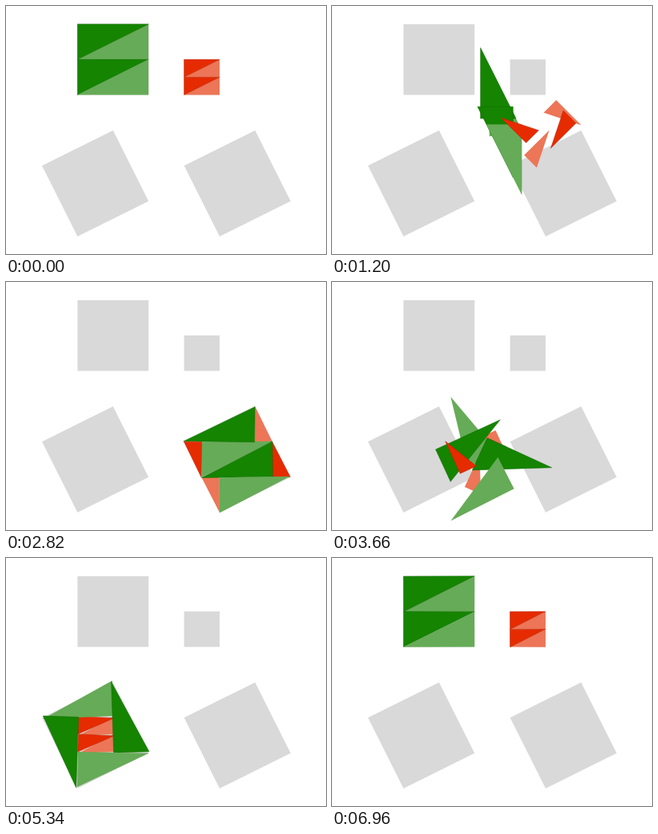
These frames come from a looping animation (400x311 px, 7.2 s). An HTML page:

```html
<!DOCTYPE html>
<html lang="en">
<head>
<meta charset="utf-8">
<title>Two squares into one</title>
<style>
  html, body { margin: 0; width: 100%; height: 100%; overflow: hidden; background: #fff; }
  svg { display: block; width: 400px; height: 311px; }
</style>
</head>
<body>
<svg id="stage" viewBox="0 0 400 311"></svg>
<script>
const UNIT = 44.4, LEFT = 45, TOP = 22.7;
const FRAME = 60, PHASE_FRAMES = 40, PHASES = 3;

const GREEN = { fill: '#158400', stroke: '#106a00', size: 1 };
const PALE_GREEN = { fill: '#66ab57', size: 1 };
const RED = { fill: '#e62b00', stroke: '#b82200', size: 0.5 };
const PALE_RED = { fill: '#ec7657', size: 0.5 };

// Centroids in sixths of a grid unit, one per layout; turns in degrees, one per phase.
const pieces = [
  { look: PALE_RED, at: [[28, 8], [37, 22], [10, 26]], angle: 180, turns: [-270, 270, -360] },
  { look: PALE_RED, at: [[28, 11], [29, 32], [10, 29]], angle: 180, turns: [270, -270, -360] },
  { look: RED, at: [[26, 7], [40, 28], [8, 25]], angle: 0, turns: [270, -270, 360] },
  { look: PALE_GREEN, at: [[14, 4], [31, 26], [8, 22]], angle: 180, turns: [180, -180, -360] },
  { look: GREEN, at: [[10, 2], [32, 22], [4, 28]], angle: 0, turns: [-180, 270, 270] },
  { look: GREEN, at: [[10, 8], [35, 28], [14, 26]], angle: 0, turns: [180, -270, -270] },
  { look: PALE_GREEN, at: [[14, 10], [34, 32], [10, 32]], angle: 180, turns: [-180, -360, 180] },
  { look: RED, at: [[26, 10], [26, 26], [8, 28]], angle: 0, turns: [-270, 270, 360] }
];

const squares = [
  [[1, 0], [3, 0], [3, 2], [1, 2]],
  [[4, 1], [5, 1], [5, 2], [4, 2]],
  [[0, 4], [2, 3], [3, 5], [1, 6]],
  [[4, 4], [6, 3], [7, 5], [5, 6]]
];

const stage = document.getElementById('stage');
const toX = x => LEFT + UNIT * x;
const toY = y => TOP + UNIT * y;
const mix = (a, b, t) => a + (b - a) * t;

function addPolygon(points, attributes) {
  const polygon = document.createElementNS('http://www.w3.org/2000/svg', 'polygon');
  polygon.setAttribute('points', points.map(p => p.join()).join(' '));
  for (const name in attributes) polygon.setAttribute(name, attributes[name]);
  stage.append(polygon);
  return polygon;
}

for (const corners of squares) {
  addPolygon(corners.map(([x, y]) => [toX(x), toY(y)]), { fill: '#d9d9d9' });
}

for (const piece of pieces) {
  const { fill, stroke = 'none', size } = piece.look;
  const leg = UNIT * size / 3;
  const corners = [[-2, -1], [4, -1], [-2, 2]].map(([x, y]) => [x * leg, y * leg]);
  piece.node = addPolygon(corners, { fill, stroke, 'stroke-width': 0.5 });
}

// Constant speed through the middle, with exponential tails at both ends.
function ease(t) {
  if (t > 0.5) return 1 - ease(1 - t);
  const speed = 3, tail = 0.155;
  const line = 0.5 + speed * (t - 0.5);
  return line > tail ? line : tail * Math.exp((line - tail) / tail);
}

function draw(ms) {
  const frame = Math.floor(ms / FRAME) % (PHASE_FRAMES * PHASES);
  const phase = Math.floor(frame / PHASE_FRAMES);
  const part = frame % PHASE_FRAMES;
  const progress = part ? ease(part / PHASE_FRAMES) : 0;

  for (const { node, at, angle, turns } of pieces) {
    const from = at[phase], to = at[(phase + 1) % PHASES];
    const x = toX(mix(from[0], to[0], progress) / 6);
    const y = toY(mix(from[1], to[1], progress) / 6);
    const turned = turns.slice(0, phase).reduce((sum, turn) => sum + turn, angle);
    const rotation = turned + turns[phase] * progress;
    node.setAttribute('transform', `translate(${x} ${y}) rotate(${rotation})`);
  }
}

const start = performance.now();
function tick() {
  draw(Math.max(0, performance.now() - start));
  requestAnimationFrame(tick);
}
tick();
</script>
</body>
</html>
```
